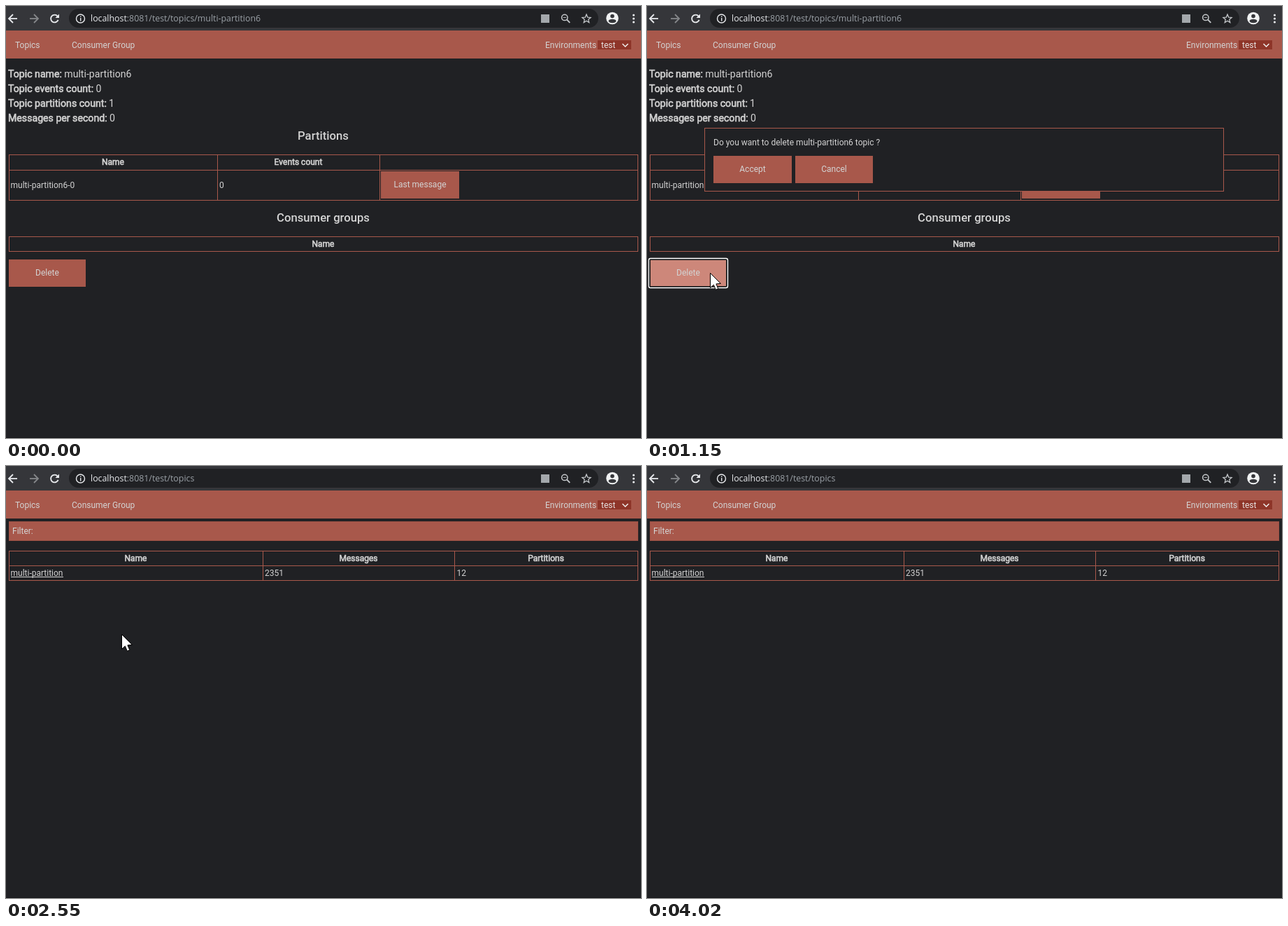
These frames come from a looping animation (908 px wide and 617 px high, 4.1 s). An HTML page with a canvas:

```html
<!DOCTYPE html>
<html lang="en">
<head>
<meta charset="utf-8">
<title>Delete topic</title>
<style>
html, body { margin: 0; width: 100%; height: 100%; overflow: hidden; background: #202124; }
canvas { display: block; }
</style>
</head>
<body>
<canvas id="stage" width="908" height="617"></canvas>
<script>
const ctx = document.getElementById('stage').getContext('2d');
const LOOP = 4100;
const BG = '#202124', RED = '#a8584b', HOVER = '#cd877a', TEXT = '#d3d3d3';

// Cursor moves: [first step, last step, steps, from, to, easing]
const easeOut = p => u => 1 - (1 - u) ** p;
const smooth = u => u * u * (3 - 2 * u);
const MOVES = [
  [150, 610, 7, [757, 600], [215, 426], easeOut(1.35), 0],
  [690, 920, 4, [215, 426], [90, 381], easeOut(1.83), 1],
  [1300, 1760, 7, [90, 381], [158, 238], smooth, 1],
  [2550, 3010, 7, [158, 238], [424, 298], u => u ** 1.88, 1],
  [3090, 3560, 7, [424, 298], [834, 600], easeOut(1.6), 1]
];

function cursorAt(t) {
  if (t < 150 || t >= 3640) return null;
  const [start, end, steps, from, to, ease, lead] = MOVES.filter(m => t >= m[0]).pop();
  const gap = (end - start) / (steps - 1);
  const step = Math.min(steps - 1, Math.floor((t - start + 4) / gap));
  const k = ease((step + lead) / (steps - 1 + lead));
  return from.map((v, i) => Math.round(v + (to[i] - v) * k));
}

function box(x, y, w, h, color) {
  ctx.fillStyle = color;
  ctx.fillRect(x, y, w, h);
}

function frame(x, y, w, h, color) {
  ctx.strokeStyle = color;
  ctx.lineWidth = 1;
  ctx.strokeRect(x + .5, y + .5, w - 1, h - 1);
}

function text(str, x, y, { size = 12, bold = false, color = TEXT, align = 'left', font = 'Roboto', weight = 400 } = {}) {
  ctx.font = `${weight} ${size}px ${font}, sans-serif`;
  ctx.textAlign = align;
  ctx.fillStyle = color;
  ctx.fillText(str, x, y);
  if (bold) {
    ctx.strokeStyle = color;
    ctx.lineWidth = .6;
    ctx.strokeText(str, x, y);
  }
  return ctx.measureText(str).width;
}

function line(points, color, width) {
  ctx.beginPath();
  points.forEach(([x, y]) => ctx.lineTo(x, y));
  ctx.strokeStyle = color;
  ctx.lineWidth = width;
  ctx.stroke();
}

function circle(x, y, r, color, width) {
  ctx.beginPath();
  ctx.arc(x, y, r, 0, Math.PI * 2);
  ctx.fillStyle = ctx.strokeStyle = color;
  ctx.lineWidth = width || 1;
  width ? ctx.stroke() : ctx.fill();
}

function button(label, x, y, w, color = RED) {
  box(x, y, w, 39, color);
  text(label, x + w / 2, y + 23, { align: 'center' });
}

function grid(cols, rows) {
  const left = cols[0], right = cols[cols.length - 1];
  const top = rows[0], bottom = rows[rows.length - 1];
  cols.forEach(x => box(x, top, 1, bottom - top + 1, RED));
  rows.forEach(y => box(left, y, right - left + 1, 1, RED));
}

const heading = (str, y) => text(str, 453.5, y, { size: 16.7, weight: 500, align: 'center' });
const columnTitle = (str, x, y) => text(str, x, y, { bold: true, align: 'center' });

function arrow(x, dir, color) {
  line([[x - 6 * dir, 18], [x + 6 * dir, 18]], color, 1.8);
  line([[x, 12], [x + 6 * dir, 18], [x, 24]], color, 1.8);
}

function star(cx, cy, r) {
  ctx.beginPath();
  for (let i = 0; i < 10; i++) {
    const a = i * Math.PI / 5 - Math.PI / 2, d = i % 2 ? r * .45 : r;
    ctx.lineTo(cx + d * Math.cos(a), cy + d * Math.sin(a));
  }
  ctx.closePath();
  ctx.strokeStyle = '#c4c7ca';
  ctx.lineWidth = 1.3;
  ctx.stroke();
}

function browserBar(path) {
  const light = '#e8eaed', gray = '#c4c7ca';
  box(0, 0, 908, 35, '#35363a');
  ctx.beginPath();
  ctx.roundRect(90, 4, 757, 27, 13.5);
  ctx.fillStyle = BG;
  ctx.fill();

  arrow(10, -1, light);
  arrow(40, 1, '#85878a');
  ctx.beginPath();
  ctx.arc(69.5, 18, 5.4, .35, Math.PI * 1.78);
  ctx.strokeStyle = light;
  ctx.lineWidth = 1.9;
  ctx.stroke();
  ctx.beginPath();
  [[76, 11.5], [76, 17], [70.5, 17]].forEach(p => ctx.lineTo(...p));
  ctx.fillStyle = light;
  ctx.fill();

  circle(106.5, 18, 6, light, 1.4);
  box(106, 17, 1.4, 4.5, light);
  box(106, 14.4, 1.4, 1.5, light);

  const style = { size: 12.36, font: '"Open Sans"', color: light };
  const w = text('localhost', 121, 22, style);
  text(':8081' + path, 121 + w, 22, { ...style, color: '#9aa0a6' });

  box(765, 12, 12, 12, '#a4a8ac');
  circle(798.8, 16.4, 4.2, gray, 1.5);
  line([[802, 19.5], [806.3, 23.8]], gray, 1.8);
  line([[796.7, 16.4], [800.9, 16.4]], gray, 1);
  star(830, 18.4, 6.4);

  circle(867, 17.5, 8.8, '#f1f3f4');
  circle(867, 14.5, 2.8, '#35363a');
  ctx.beginPath();
  ctx.ellipse(867, 21.5, 5.4, 2.7, 0, 0, Math.PI * 2);
  ctx.fill();
  [13, 18, 23].forEach(y => circle(897.5, y, 1.6, light));
}

function navBar() {
  box(0, 35, 908, 40, RED);
  text('Topics', 13, 60);
  text('Consumer Group', 94, 60);
  text('Environments', 771, 60);
  box(846, 49, 48, 13, '#8e3529');
  text('test', 851, 59.5, { color: '#e8e4e3' });
  line([[881.5, 54], [885.5, 58], [889.5, 54]], '#f0eeee', 1.5);
}

function dialog(t) {
  box(82, 174, 743, 91, BG);
  frame(82, 174, 743, 91, RED);
  text('Do you want to delete multi-partition6 topic ?', 95, 199);
  button('Accept', 95, 214, 112, t >= 1685 && t < 1930 ? HOVER : RED);
  button('Cancel', 212, 214, 111);
}

function topicPage(t) {
  [['Topic name:', 'multi-partition6'], ['Topic events count:', '0'],
   ['Topic partitions count:', '1'], ['Messages per second:', '0']].forEach(([label, value], i) => {
    const y = 102 + 21 * i;
    const w = text(label, 3, y, { size: 14.15, bold: true });
    text(value, 3 + w + 3.3, y, { size: 14.15 });
  });

  heading('Partitions', 191);
  grid([4, 302, 534, 903], [212, 234, 277]);
  columnTitle('Name', 153, 227);
  columnTitle('Events count', 418, 227);
  text('multi-partition6-0', 6.5, 259.5);
  text('0', 305, 259.5);
  button('Last message', 536, 236, 112);

  heading('Consumer groups', 308);
  grid([4, 903], [329, 350]);
  columnTitle('Name', 453.5, 344);

  button('Delete', 4, 362, 110, t >= 840 && t < 1380 ? HOVER : RED);
  if (t >= 1065 && t < 1930) {
    ctx.beginPath();
    ctx.roundRect(2.5, 360.5, 113, 42, 2.5);
    ctx.strokeStyle = '#fff';
    ctx.lineWidth = 1.4;
    ctx.stroke();
    frame(4, 362, 110, 39, '#181818');
  }
  if (t >= 1145 && t < 2090) dialog(t);
}

function listPage() {
  box(4, 79, 900, 28, RED);
  frame(4, 79, 900, 28, '#9c5145');
  text('Filter:', 9, 97);
  grid([4, 367, 641, 903], [121, 142, 163]);
  columnTitle('Name', 185.5, 136);
  columnTitle('Messages', 504, 136);
  columnTitle('Partitions', 772, 136);
  const w = text('multi-partition', 6.5, 157);
  box(7, 158, Math.round(w), 1, TEXT);
  text('2351', 370, 157);
  text('12', 644.5, 157);
}

function cursor([x, y]) {
  ctx.beginPath();
  [[.5, .5], [.5, 21.5], [5.3, 17.2], [8.3, 24.3], [11.8, 22.8], [8.9, 15.9], [15.3, 15.4]]
    .forEach(([dx, dy]) => ctx.lineTo(x + dx, y + dy));
  ctx.closePath();
  ctx.fillStyle = '#fff';
  ctx.fill();
  ctx.strokeStyle = '#000';
  ctx.lineWidth = 1;
  ctx.stroke();
}

function draw(t) {
  const listed = t >= 2170;
  box(0, 0, 908, 617, BG);
  browserBar(listed ? '/test/topics' : '/test/topics/multi-partition6');
  navBar();
  listed ? listPage() : topicPage(t);
  box(0, 616, 908, 1, '#151618');
  const pos = cursorAt(t);
  if (pos) cursor(pos);
}

const begin = performance.now();
function tick() {
  draw((performance.now() - begin) % LOOP);
  requestAnimationFrame(tick);
}
tick();
</script>
</body>
</html>
```
